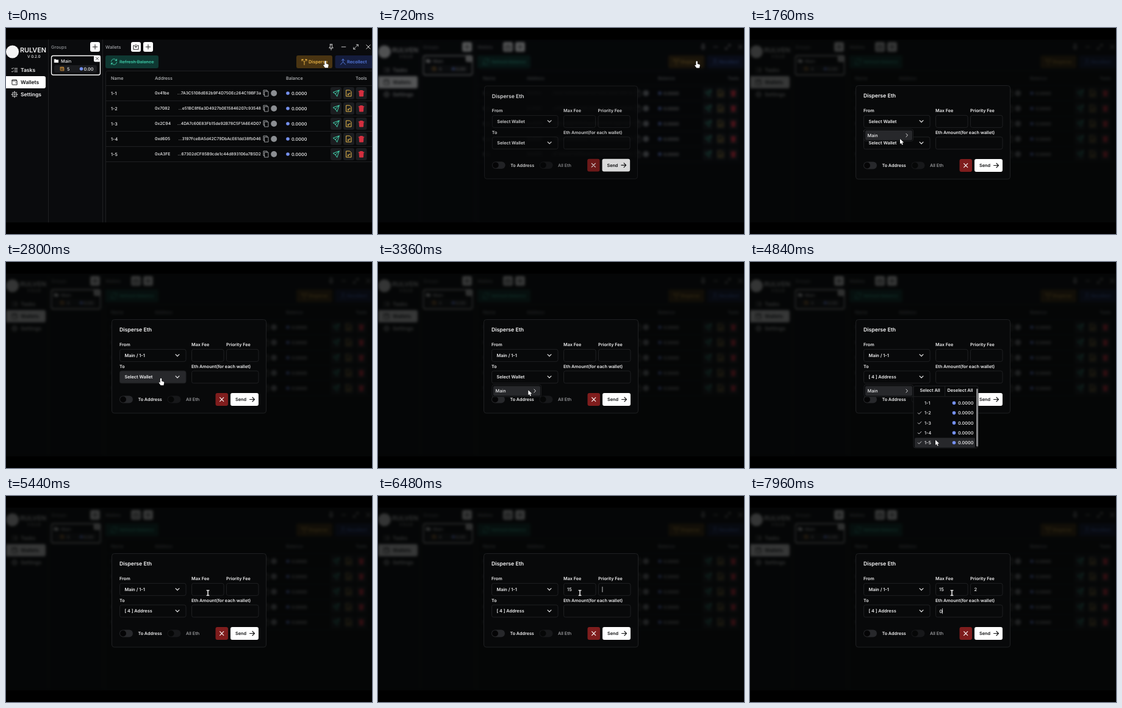
These frames come from a looping animation (600 by 338 pixels, 8 s). An HTML page:

```html
<!DOCTYPE html>
<html lang="en">
<head>
<meta charset="utf-8">
<title>Wallet disperse</title>
<style>
  html, body { margin: 0; width: 100%; height: 100%; overflow: hidden; background: #000; }
  svg { position: absolute; left: 0; top: 0; width: 100%; height: 100%; }
  text { font-family: Inter, sans-serif; white-space: pre; text-rendering: geometricPrecision; }
</style>
</head>
<body>
<svg id="app" viewBox="0 0 600 338"></svg>
<svg id="overlay" viewBox="0 0 600 338"></svg>
<script>
const LOOP = 8000;
const ETH_BLUE = '#7590ee';
const HOVER = '#27282b';
const LINE = '#1f2022';
const PANEL = '#08090a';
const ROW = 16.3;

const ICONS = {
  plus: 'M4 12h16M12 4v16',
  cross: 'M5 5l14 14M19 5L5 19',
  minus: 'M4 12h16',
  download: 'M12 3v11M8 10l4 4 4-4M7 7H3v14h18V7h-4',
  expand: 'M14 3h7v7M21 3l-8 8M10 21H3v-7M3 21l8-8',
  pin: 'M12 16v7M8 3h8M9 3v7l-4 6h14l-4-6V3',
  refresh: 'M3 11a9 9 0 0 1 15-6l3 3M21 3v5h-5M21 13a9 9 0 0 1-15 6l-3-3M3 21v-5h5',
  split: 'M12 22V12L4 4M12 12l8-8M4 9V4h5M15 4h5v5',
  merge: 'M12 3v9L4 21M12 12l8 9M7 8l5-5 5 5',
  tasks: 'M2 6l2 2 4-4M2 17l2 2 4-4M12 6h10M12 12h10M12 18h10',
  wallet: 'M19 7V3H5a2 2 0 0 0 0 4h16v14H5a2 2 0 0 1-2-2V5M16 14h2',
  gear: 'M12 1v4M12 19v4M1 12h4M19 12h4M4 4l3 3M17 17l3 3M4 20l3-3M17 7l3-3M12 4a8 8 0 1 0 .01 0M12 9a3 3 0 1 0 .01 0',
  folder: 'M2 4h7l3 3h10v13H2z',
  copy: 'M8 6h12v16H8zM16 6V2H4v15h4',
  send: 'M22 2L2 9l8 5 5 8zM22 2L10 14',
  fileKey: 'M4 2h11l5 5v15H4zM10 14a2 2 0 1 0 .01 0M12 15l4-4M14 12l2 2',
  trash: 'M3 6h18M8 6V3h8v3M5 6l1 16h12l1-16z',
  down: 'M5 8l7 7 7-7',
  right: 'M9 5l7 7-7 7',
  check: 'M3 12l6 6L21 6',
  arrow: 'M3 12h18M13 4l8 8-8 8'
};

const CURSORS = {
  hand: 'M-1.2 1a1.2 1.2 0 0 1 2.4 0v3.6l3 .8q1.2 .4 1 1.6l-.8 4.2h-4.8l-2.9-4q.2-1.6 2.1-.2z',
  arrow: 'M0 0v8.4l1.9-1.8 1.3 3.1 1.5-.6-1.3-3h2.7z',
  beam: 'M-2.4-4.8h4.8v1.3h-1.7v7h1.7v1.3h-4.8v-1.3h1.7v-7h-1.7z'
};

const rect = (x, y, w, h, fill, r = 0, stroke = 'none', sw = 1) =>
  `<rect x="${x}" y="${y}" width="${w}" height="${h}" rx="${r}" fill="${fill}" stroke="${stroke}" stroke-width="${sw}"/>`;
const dot = (x, y, r, fill) => `<circle cx="${x}" cy="${y}" r="${r}" fill="${fill}"/>`;
const icon = (name, x, y, size, color, sw = 2, fill = 'none') =>
  `<path d="${ICONS[name]}" transform="translate(${x - size / 2} ${y - size / 2}) scale(${size / 24})" fill="${fill}" stroke="${color}" stroke-width="${sw}" stroke-linecap="round" stroke-linejoin="round"/>`;
// y is the middle of the capitals
const text = (x, y, str, fill = '#f2f2f3', weight = 500, size = 7.3, extra = '') =>
  `<text x="${x}" y="${y + size * 0.36}" fill="${fill}" font-weight="${weight}" font-size="${size}" ${extra}>${str}</text>`;

function drawApp() {
  const whiteButton = (x, name) => rect(x, 23, 16, 16, '#fff', 3) + icon(name, x + 8, 31, 11, '#0b0c0d');
  const menuItem = (y, name, label, color) => icon(name, 14, y, 11, color) + text(24, y, label, color, 600, 8.5);
  const wallets = [
    ['0x41be', '...7A3C5108dE62b9F4D750Ec264C19BF3a'],
    ['0x7082', '...e51BC8f6a3D4927b0E15846207c93548'],
    ['0x2C94', '...4DA7c60E83Fb15de92B78C5F1A6E4D07'],
    ['0xd605', '...3197FceBA5d42C79DbAcE61dd38fb046'],
    ['0xA3FE', '...67302dCF85B9cde1c44d893106a7B5D2']
  ];
  const tools = [[532, 'send', '#43d3ae', 'none'], [553, 'fileKey', '#e9b949', 'none'], [573.5, 'trash', '#d32f3f', '#d32f3f']];

  const rows = wallets.map(([head, tail], i) => {
    const y = 107 + i * 25;
    return text(172, y, `1-${i + 1}`) +
      text(244, y, head, '#f2f2f3', 500, 6.8) +
      text(418, y, tail, '#f2f2f3', 500, 6.7, 'text-anchor="end"') +
      icon('copy', 426, y, 12, '#a5a7aa', 1.8) + dot(439.2, y, 5, '#8b8e92') +
      dot(462, y, 2.8, ETH_BLUE) + text(468, y, '0.0000') +
      tools.map(([x, name, color, fill]) =>
        rect(x, y - 10, 18, 20, '#1b1d20', 3) + icon(name, x + 9, y, 12, color, 2, fill)).join('') +
      rect(163, y + 12, 437, 1, LINE);
  }).join('');

  return rect(0, 19, 600, 300, '#0a0b0d') +
    rect(69, 19, 1, 300, LINE) + rect(158, 19, 1, 300, LINE) +
    dot(10.5, 39, 10.5, '#f4f4f5') +
    text(23, 36, 'RULVEN', '#f4f4f5', 600, 10.8) + text(35, 46.5, 'V 0.2.0', '#e4e4e6', 500, 6.3) +
    menuItem(69, 'tasks', 'Tasks', '#f4f4f5') +
    rect(-4, 79, 69, 20, '#fff', 3) + menuItem(89, 'wallet', 'Wallets', '#0b0c0d') +
    menuItem(109, 'gear', 'Settings', '#f4f4f5') +

    text(74, 31, 'Groups', '#8f9195') + whiteButton(138, 'plus') +
    rect(74.5, 45.5, 80, 31.5, '#0a0b0d', 3, '#fff', 1.3) +
    icon('folder', 82.5, 54, 8, '#fff', 1, '#fff') + text(90, 54, 'Main') +
    rect(144, 45, 11, 10.5, '#fff', 2) + icon('cross', 149.5, 50.2, 7.5, '#0b0c0d', 2.5) +
    rect(79, 61, 70, 12, '#1b1c1f', 3) + icon('wallet', 92, 67, 8, '#e8a13e', 2, '#e8a13e55') +
    text(100, 67, '5') + dot(123.5, 67, 2.8, ETH_BLUE) + text(127.5, 67, '0.00') +

    text(163, 31, 'Wallets', '#a4a6aa') + whiteButton(205, 'download') + whiteButton(225, 'plus') +
    icon('pin', 533, 31, 11, '#eee') + icon('minus', 553.5, 31, 10, '#eee') +
    icon('expand', 573.5, 31, 10, '#eee') + icon('cross', 594, 31, 11, '#eee') +
    rect(163, 45, 87, 21, '#0f3832', 3) + icon('refresh', 177, 55.5, 12, '#3cc3a1') +
    text(186, 55.5, 'Refresh Balance', '#36b394', 600, 7.2, 'text-decoration="line-through"') +
    rect(476, 45, 59, 21, '#493412', 3) + icon('split', 489, 55.5, 12, '#e8b143') +
    text(496, 55.5, 'Disperse', '#e8b143', 600) +
    rect(539.5, 45, 64, 21, '#151d3d', 3) + icon('merge', 552.5, 55.5, 12, '#5479dd') +
    text(559, 55.5, 'Recollect', '#5479dd', 600) +

    rect(163.5, 70.5, 445, 260, PANEL, 3, LINE) + rect(163, 94, 437, 1, LINE) +
    [[172, 'Name'], [244, 'Address'], [459, 'Balance'], [573, 'Tools']]
      .map(([x, label]) => text(x, 82.5, label, '#b9bbbe')).join('') +
    rows;
}

// Value of the last step that has started
const stepAt = (t, steps) => steps.reduce((value, [start, next]) => t >= start ? next : value, steps[0][1]);
const during = (t, from, to) => t >= from && t < to;
const smooth = k => k * k * (3 - 2 * k);
const progress = (t, from, length) => smooth(Math.min(1, Math.max(0, (t - from) / length)));

const PATH = [
  [0, 523.5, 54], [700, 523.5, 54], [1320, 252, 151], [1560, 252, 151], [1740, 246, 182], [1880, 246, 181],
  [2180, 290, 176], [2400, 290, 176], [2720, 254, 191], [2980, 254, 191], [3180, 240, 209], [3340, 246, 210],
  [3800, 300, 247], [3900, 301, 249], [4060, 301, 249], [4240, 302, 265], [4320, 302, 265], [4480, 303, 280],
  [4560, 303, 280], [4720, 304, 292], [4980, 304, 292], [5400, 331, 159], [LOOP, 331, 159]
];

function pointerAt(t) {
  const i = PATH.findIndex(p => p[0] > t);
  const [t0, x0, y0] = PATH[i - 1], [t1, x1, y1] = PATH[i];
  const k = smooth((t - t0) / (t1 - t0));
  return [x0 + (x1 - x0) * k, y0 + (y1 - y0) * k];
}

function drawPointer(t) {
  const shape = stepAt(t, [[0, 'hand'], [780, 'arrow'], [1240, 'hand'], [1600, 'arrow'], [2620, 'hand'], [3040, 'arrow'], [5340, 'beam']]);
  const [x, y] = pointerAt(t);
  return `<path d="${CURSORS[shape]}" transform="translate(${x} ${y})" fill="#fff" stroke="#111" stroke-width=".8" stroke-linejoin="round" paint-order="stroke"/>`;
}

const drawSelect = (y, label, hovered) =>
  rect(186.5, y - 10, 108.5, 20, hovered ? HOVER : PANEL, 3, LINE) +
  text(194.5, y, label, '#f2f2f3', 600) + icon('down', 281, y, 10, '#f2f2f3', 2.8);

function drawInput(x, y, w, textX, value, caret) {
  return rect(x + .5, y - 10, w, 20, PANEL, 3, LINE) + text(textX, y, value, '#f2f2f3', 500, 7.6) +
    (caret ? rect(textX + value.length * 4.6, y - 4.5, .8, 9, '#f2f2f3') : '');
}

const drawMenu = (y, active) =>
  rect(187, y - 10, 80.5, 19.5, PANEL, 3, LINE) +
  (active ? rect(189, y - 8, 77, 16, HOVER, 2) : '') +
  text(192.5, y, 'Main') + icon('right', 257, y, 9, '#f2f2f3', 2.4);

const drawOptions = (firstY, hovered, checked) => [0, 1, 2, 3, 4].map(i => {
  const y = firstY + i * ROW;
  return (i === hovered ? rect(270, y - 8, 99, 16, HOVER, 2) : '') +
    (checked.includes(i) ? icon('check', 278, y, 7.5, '#f2f2f3', 2.6) : '') +
    text(286, y, `1-${i + 1}`) + dot(334.5, y, 2.8, ETH_BLUE) + text(341, y, '0.0000');
}).join('');

function drawFromMenu(t) {
  let out = drawMenu(176, t >= 1640);
  if (t >= 1960) out += rect(268, 167.5, 105.5, 81.5, PANEL, 3, LINE) +
    drawOptions(176, stepAt(t, [[0, -1], [2100, 0]]), []);
  return out;
}

function drawToMenu(t, count) {
  let out = drawMenu(211.5, t >= 3160);
  if (t < 3400) return out;
  const scroll = 3.7 * progress(t, 4600, 80);
  const hovered = stepAt(t, [[0, -1], [3600, 0], [3780, 1], [4180, 2], [4420, 3], [4620, 4]]);
  return out + rect(268, 203.5, 106, 101.5, PANEL, 3, LINE) +
    `<g clip-path="url(#menuClip)"><g transform="translate(0 ${-scroll})">` +
    text(278.5, 214, 'Select All', '#f2f2f3', 600) + text(323.5, 214, 'Deselect All', '#f2f2f3', 600) +
    rect(319, 204, 1, 20, LINE) + rect(268, 224, 102, 1, LINE) +
    drawOptions(235, hovered, [1, 2, 3, 4].slice(0, count)) + '</g></g>' +
    rect(371, 204.5 + scroll * .9, 2.8, 95, '#8a8b8d', 1.4);
}

function drawDialog(t) {
  const count = stepAt(t, [[0, 0], [3990, 1], [4280, 2], [4520, 3], [4790, 4]]);
  const maxFee = stepAt(t, [[0, ''], [5840, '1'], [6000, '15']]);
  const priority = stepAt(t, [[0, ''], [6840, '2']]);
  const amount = stepAt(t, [[0, ''], [7680, '0']]);
  const focus = stepAt(t, [[0, ''], [5480, 'max'], [6320, 'priority'], [7240, 'amount']]);
  const lastKey = stepAt(t, [0, 5480, 5840, 6000, 6320, 6840, 7240, 7680].map(key => [key, key]));
  const blink = (t - lastKey) % 1000 < 500;
  const label = (x, y, str) => text(x, y, str, '#f2f2f3', 600, 7.2);

  return rect(173.5, 94.5, 253, 153.5, PANEL, 4, LINE) +
    text(186, 111, 'Disperse Eth', '#f7f7f8', 600, 8.7) +
    label(186, 135.5, 'From') + label(304, 135.5, 'Max Fee') + label(361, 135.5, 'Priority Fee') +
    label(186, 171, 'To') + label(304, 171, 'Eth Amount(for each wallet)') +
    drawSelect(153.3, t < 2400 ? 'Select Wallet' : 'Main / 1-1', during(t, 1260, 1580)) +
    drawSelect(188.8, count ? `[ ${count} ] Address` : 'Select Wallet', during(t, 2620, 3040)) +
    drawInput(304, 153.3, 52.5, 310, maxFee, focus === 'max' && blink) +
    drawInput(361, 153.3, 52.5, 367.5, priority, focus === 'priority' && blink) +
    drawInput(304, 188.8, 109.5, 310.5, amount, focus === 'amount' && blink) +
    rect(186, 219.5, 22, 12, '#27282b', 6) + dot(192, 225.5, 5, '#050506') + label(216.5, 225.5, 'To Address') +
    rect(264.5, 219.5, 22, 12, '#17181a', 6) + dot(270.5, 225.5, 5, '#060707') + text(295, 225.5, 'All Eth', '#a9aaad') +
    rect(343.5, 215, 20.5, 21, '#7f1d1d', 3) + icon('cross', 353.7, 225.5, 10.5, '#fff', 2.6) +
    rect(368, 215, 46, 21, '#fff', 3) + text(376, 225.5, 'Send', '#0b0c0d', 600) + icon('arrow', 403.5, 225.5, 10.5, '#0b0c0d', 2.6) +
    (during(t, 1580, 2400) ? drawFromMenu(t) : '') +
    (during(t, 3040, 5000) ? drawToMenu(t, count) : '');
}

const app = document.getElementById('app');
const overlay = document.getElementById('overlay');
app.innerHTML = drawApp();

function render(now) {
  const t = now % LOOP;
  const open = progress(t, 570, 200);
  const scale = .95 + .05 * open;
  app.style.filter = open ? `blur(${2.3 * open}px)` : 'none';
  overlay.innerHTML = '<clipPath id="menuClip"><rect x="268" y="204" width="106" height="100.5"/></clipPath>' +
    `<g opacity="${open * .8}">${rect(0, 19, 600, 300, '#040506')}</g>` +
    rect(0, 0, 600, 19, '#000') + rect(0, 319, 600, 19, '#000') +
    (open ? `<g opacity="${open}" transform="translate(300 171) scale(${scale}) translate(-300 -171)">${drawDialog(t)}</g>` : '') +
    drawPointer(t);
}

const start = performance.now();
function tick() {
  render(performance.now() - start);
  requestAnimationFrame(tick);
}
tick();
</script>
</body>
</html>
```
